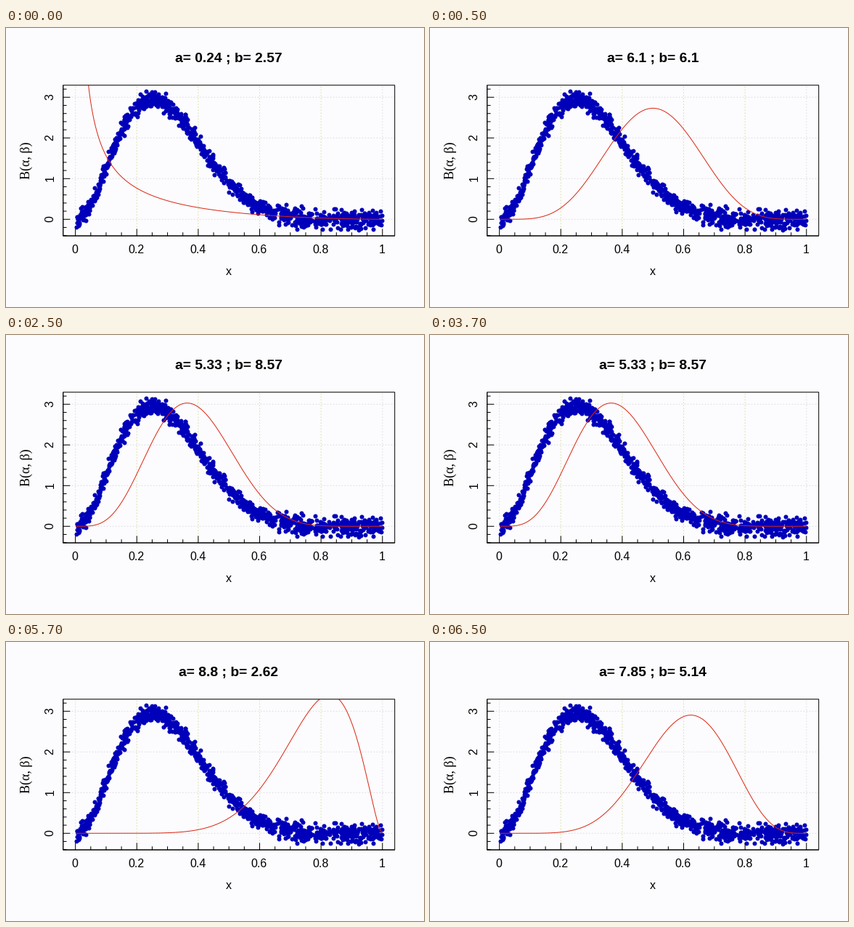
Animation of 576 by 384 pixels, one loop 8000 ms. Source, as a matplotlib script:

```python
import math

import numpy as np
import matplotlib.pyplot as plt
from matplotlib.animation import FuncAnimation
from matplotlib.patches import Rectangle

W, H, DPI = 576, 384, 96
PT = 72 / DPI
LINE = 19.2  # height of one margin line
LEFT, RIGHT = 4.1 * LINE, W - 2.1 * LINE
TOP, BOTTOM = 4.1 * LINE, H - 5.1 * LINE
INK, PAPER = "black", "#fcfcfe"
SHAPES = [(0.24, 2.57), (6.1, 6.1), (5.33, 8.57), (8.8, 2.62), (7.85, 5.14)]


def px(x):
    return LEFT + (RIGHT - LEFT) * (np.asarray(x) + 0.04) / 1.08


def py(y):
    return 263.3 - 56 * np.asarray(y)


def beta_pdf(x, a, b):
    norm = math.gamma(a + b) / (math.gamma(a) * math.gamma(b))
    return norm * x ** (a - 1) * (1 - x) ** (b - 1)


fig = plt.figure(figsize=(W / DPI, H / DPI), dpi=DPI, facecolor=PAPER)
ax = fig.add_axes([0, 0, 1, 1])
ax.set(xlim=(0, W), ylim=(H, 0))
ax.axis("off")


def line(xs, ys, color=INK, **style):
    return ax.plot(xs, ys, color=color, lw=PT, solid_capstyle="butt",
                   snap=False, **style)[0]


def label(x, y, text, size=16, angle=0, font="Liberation Sans", weight="normal"):
    return ax.text(x, y, text, fontsize=size * PT, family=font, weight=weight,
                   rotation=angle, rotation_mode="anchor", ha="center",
                   va="baseline", color="black")


# Dotted grid
dots = dict(ls=(0, (1.6, 2.4)), zorder=1)
for i in range(6):
    x = px(i / 5)
    line([x, x], [BOTTOM, TOP], "#dcdce4" if i in (0, 5) else "#dcdc9c", **dots)
for i in range(4):
    line([LEFT, RIGHT], [py(i), py(i)], "#dadae2", **dots)

# Noisy samples around a beta density, with a few stragglers
rng = np.random.default_rng(11)
xs = rng.uniform(0, 1, 1000)
noise = np.clip(rng.normal(0, 0.1, xs.size), -0.25, 0.25)
ys = beta_pdf(xs, 3.25, 7.75) + noise
stray_x = [193, 205, 220, 185, 386, 407, 401, 486, 436, 100, 516, 490]
stray_y = [87, 88, 90, 91, 243, 245, 277, 278, 277, 272, 252, 250]
ax.scatter(np.append(px(xs), stray_x), np.append(py(ys), stray_y),
           s=(6 * PT) ** 2, c="#0000ba", linewidths=0, zorder=2)

# Frame, axis lines and inward ticks
box = Rectangle((LEFT, TOP), RIGHT - LEFT, BOTTOM - TOP, fill=False,
                ec=INK, lw=PT, snap=False, zorder=4)
ax.add_patch(box)
line([LEFT, LEFT, RIGHT], [TOP, BOTTOM, BOTTOM], zorder=4)
for i in range(21):
    x = px(i / 20)
    line([x, x], [BOTTOM, BOTTOM - (4.8 if i % 4 else 9.6)], zorder=4)
for i in range(-2, 17):
    y = py(i / 5)
    line([LEFT, LEFT + (4.8 if i % 5 else 9.6)], [y, y], zorder=4)

for i in range(6):
    label(px(i / 5) - 0.7, 310.5, f"{i / 5:g}")
for i in range(4):
    label(65.5, py(i) - 0.8, str(i), angle=90)
label(307, 340, "x")
label(33, 181.8, "B(α, β)", size=18, angle=90, font="Liberation Serif")

title = label(307, 47, "", size=19.2, weight="bold")
curve = line([], [], "#dc2814", zorder=3)
curve.set_clip_path(box)
grid_x = np.linspace(0.001, 1, 800)


def update(frame):
    # The first pair shows for one step, each later pair for four
    a, b = SHAPES[(frame + 3) // 4]
    title.set_text(f"a= {a:g} ; b= {b:g}")
    curve.set_data(px(grid_x), py(beta_pdf(grid_x, a, b)))
    return title, curve


anim = FuncAnimation(fig, update, frames=16, interval=500, repeat=True,
                     repeat_delay=0, blit=False)
plt.show()
```
